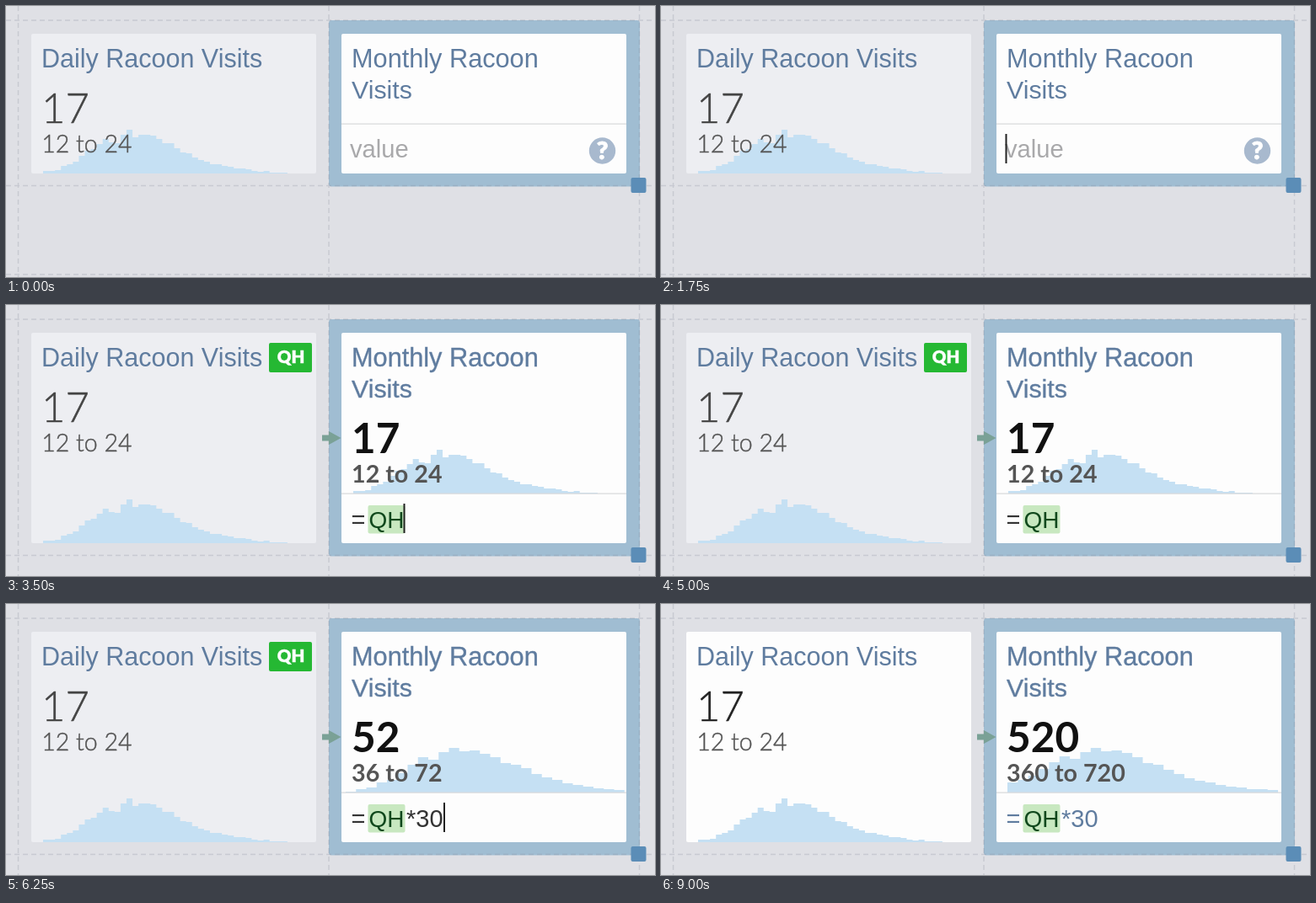
Write an HTML page that moves like this. It is 770x322 px and loops after 9250 ms.

```html
<!DOCTYPE html>
<html lang="en">
<head>
<meta charset="utf-8">
<title>Racoon visits</title>
<style>
html, body { margin: 0; width: 100%; height: 100%; overflow: hidden; background: #dfe0e5; }
svg { display: block; width: 770px; height: 322px; }
text { white-space: pre; }
.sans { font-family: "Liberation Sans", Arial, sans-serif; }
.lato { font-family: Lato, sans-serif; }
</style>
</head>
<body>
<svg id="stage" viewBox="0 0 770 322"></svg>
<script>
const LOOP = 9250;
const stage = document.getElementById('stage');
const BLUE = '#5f7c9f', INK = '#333';

const DAILY = { x: 44, w: 7.07, h: [3, 3, 4, 9, 11, 14, 21, 27, 29, 35, 41, 37, 36, 46, 52, 43, 46, 46, 45,
  41, 36, 36, 30, 25, 24, 19, 16, 14, 11, 11, 9, 8, 6, 6, 5, 3, 2, 3, 1, 1, 1] };
const COPY = { ...DAILY, x: DAILY.x + 368 };
const TRIPLE = { x: 403, w: 12.25, h: [1, 4, 6, 12, 15, 23, 33, 42, 39, 48, 53, 49, 50, 46, 42, 35, 33, 29, 22,
  18, 15, 11, 9, 7, 5, 4, 3] };
const MONTHLY = { x: 411, w: 12.35, h: [12, 15, 20, 28, 36, 43, 40, 48, 53, 49, 50, 47, 42, 35, 33, 27, 22, 17,
  14, 12, 9, 7, 6, 4, 4, 3] };

const RESULTS = {
  same: { mean: '17', range: '12 to 24', hist: COPY },
  triple: { mean: '52', range: '36 to 72', hist: TRIPLE },
  full: { mean: '520', range: '360 to 720', hist: MONTHLY }
};

// Each step changes part of the state from its time onward.
const STEPS = [
  [0, { formula: '', bottom: 199, caret: 0, badge: false, done: false, hover: '', pointer: '', result: '' }],
  [500, { pointer: 'arrow' }],
  [750, { pointer: 'beam', caret: 1 }],
  [1000, { pointer: '', hover: 'card' }],
  [1250, { hover: 'next', caret: 0 }],
  [1500, { hover: '' }],
  [1750, { caret: 1 }],
  [2000, { formula: '=', bottom: 197, badge: true }],
  [2500, { caret: 0 }],
  [3000, { caret: 1 }],
  [3250, { formula: '=Q' }],
  [3500, { formula: '=QH', bottom: 283, result: 'same' }],
  [4000, { caret: 0 }],
  [4500, { caret: 1 }],
  [5000, { caret: 0 }],
  [5500, { formula: '=QH*', bottom: 199, result: '', caret: 1 }],
  [5750, { caret: 0 }],
  [6250, { formula: '=QH*30', bottom: 283, result: 'triple', caret: 1 }],
  [6500, { result: 'full' }],
  [7000, { caret: 0 }],
  [7500, { caret: 1 }],
  [8000, { caret: 0 }],
  [8500, { caret: 1 }],
  [9000, { caret: 0, badge: false, done: true }]
];

const CARET_X = { '': 409.5, '=': 428.5, '=Q': 451.5, '=QH': 472.5, '=QH*': 486.5, '=QH*30': 520 };

const rect = (x, y, w, h, fill, r = 0) =>
  `<rect x="${x}" y="${y}" width="${w}" height="${h}" rx="${r}" fill="${fill}"/>`;
const text = (font, x, y, size, fill, str, extra = '') =>
  `<text class="${font}" x="${x}" y="${y}" font-size="${size}" fill="${fill}" ${extra}>${str}</text>`;
const path = (d, fill, extra = '') => `<path d="${d}" fill="${fill}" ${extra}/>`;
const outline = (color, width) => `stroke="${color}" stroke-width="${width}"`;

function histogram({ x, w, h }, base) {
  const tops = h.map(v => `V${base - v}h${w}`).join('');
  return path(`M${x} ${base}${tops}V${base}Z`, '#c5e0f3');
}

function grid(bottom) {
  const low = bottom + 14.5;
  const next = low + 105.5;
  const d = `M14.5 0V322M383 0V322M751.5 0V322M0 17H770M0 ${low}H770M0 ${next}H770`;
  return path(d, 'none', 'stroke="rgba(130,135,150,.25)" stroke-width="1.4" stroke-dasharray="6 4"');
}

function dailyCard(s) {
  const ink = s.done ? '#222' : '#444';
  const light = color => `font-weight="300" ${outline(color, 0.45)}`;
  return rect(30, 33, 338, s.bottom - 33, s.done ? '#fdfdfd' : '#edeef2', 2) +
    histogram(DAILY, s.bottom) +
    text('sans', 42, 73, 30.5, BLUE, 'Daily Racoon Visits') +
    text('lato', 42, 139, 49, ink, '17', light(ink)) +
    text('lato', 42.3, 174, 28.5, '#555', '12 to 24', light('#555')) +
    (s.badge ? rect(312, 45, 51, 35, '#25b833', 2) +
      text('lato', 338, 69, 20.5, '#fff', 'QH',
        `font-weight="900" text-anchor="middle" ${outline('#fff', 0.4)}`) : '');
}

function formulaRow(s, base) {
  const color = s.done ? BLUE : INK;
  const f = s.formula;
  let out = '';
  if (!f) {
    out += text('sans', 408, base - 0.5, 29.2, '#a9a9ab', 'value') +
      '<circle cx="707.5" cy="172" r="15.7" fill="#a8b9ce"/>' +
      text('lato', 707.5, 182, 29, '#fff', '?',
        `font-weight="900" text-anchor="middle" ${outline('#fff', 0.8)}`);
  } else if (f.startsWith('=QH')) {
    out += text('sans', 409.5, base, 29, color, '=') +
      rect(429.5, base - 26.5, 44, 33.5, '#c8e8c0', 2) +
      text('sans', 430.5, base, 28, '#10481c', 'QH') +
      text('sans', 475, base, 29, color, f.slice(3));
  } else {
    out += text('sans', 409.5, base, 29.5, INK, f);
  }
  if (s.caret) out += rect(CARET_X[f] - 1, base - 28.5, 2, 35, '#222');
  return out;
}

function frame(s) {
  return rect(383, 17, 369, s.bottom - 1.5, 'rgba(145,181,205,.8)', 3);
}

function monthlyCard(s) {
  const result = RESULTS[s.result];
  const split = result ? 224 : 140;
  const heavy = result ? outline(BLUE, 0.35) : '';
  let out = rect(398, 33, 338, s.bottom - 33, '#fdfdfd', 2);
  if (result) out += histogram(result.hist, split);
  out += rect(398, split - 0.5, 338, 1.2, '#d8d9db') +
    text('sans', 410, 73, 30.7, BLUE, 'Monthly Racoon', heavy) +
    text('sans', 410, 110, 30.3, BLUE, 'Visits', heavy);
  if (result) {
    out += text('lato', 410, 176, 49.5, '#111', result.mean, 'font-weight="700"') +
      text('lato', 410, 211, 28.7, '#555', result.range, 'font-weight="700"');
  }
  return out + formulaRow(s, split + 40.5) +
    rect(741.5, s.bottom + 5, 18, 18, '#5b8db7', 2);
}

function link(s) {
  if (!s.formula.startsWith('=QH')) return '';
  const y = (33 + s.bottom) / 2;
  return path(`M375 ${y - 3.5}h8v-4.5l14.5 8l-14.5 8v-4.5h-8Z`, '#7aa196');
}

function hoverCell(s) {
  const x = { card: 383, next: 752 }[s.hover];
  return x ? rect(x, 17, 369, s.bottom - 1.5, '#d5d9e1') : '';
}

function pointer(kind) {
  if (kind === 'arrow') {
    return path('M512.5 187.5v15l3.5-3.3l2.3 5.3l2.6-1.1l-2.3-5.2h5Z', '#111', 'stroke="#fff"');
  }
  if (kind === 'beam') {
    return path('M557.5 146.5q3.5 0 3.5 3q0-3 3.5-3M561 149v13M557.5 164.5q3.5 0 3.5-3q0 3 3.5 3', 'none', 'stroke="#222"');
  }
  return '';
}

let shown = -1;
function draw(t) {
  const count = STEPS.filter(([at]) => at <= t).length;
  if (count === shown) return;
  shown = count;
  const s = Object.assign({}, ...STEPS.slice(0, count).map(step => step[1]));
  stage.innerHTML = rect(0, 0, 770, 322, '#dfe0e5') + hoverCell(s) + frame(s) + grid(s.bottom) +
    dailyCard(s) + monthlyCard(s) + link(s) + pointer(s.pointer);
}

const start = performance.now();
function tick() {
  draw((performance.now() - start) % LOOP);
  requestAnimationFrame(tick);
}
tick();
</script>
</body>
</html>
```
